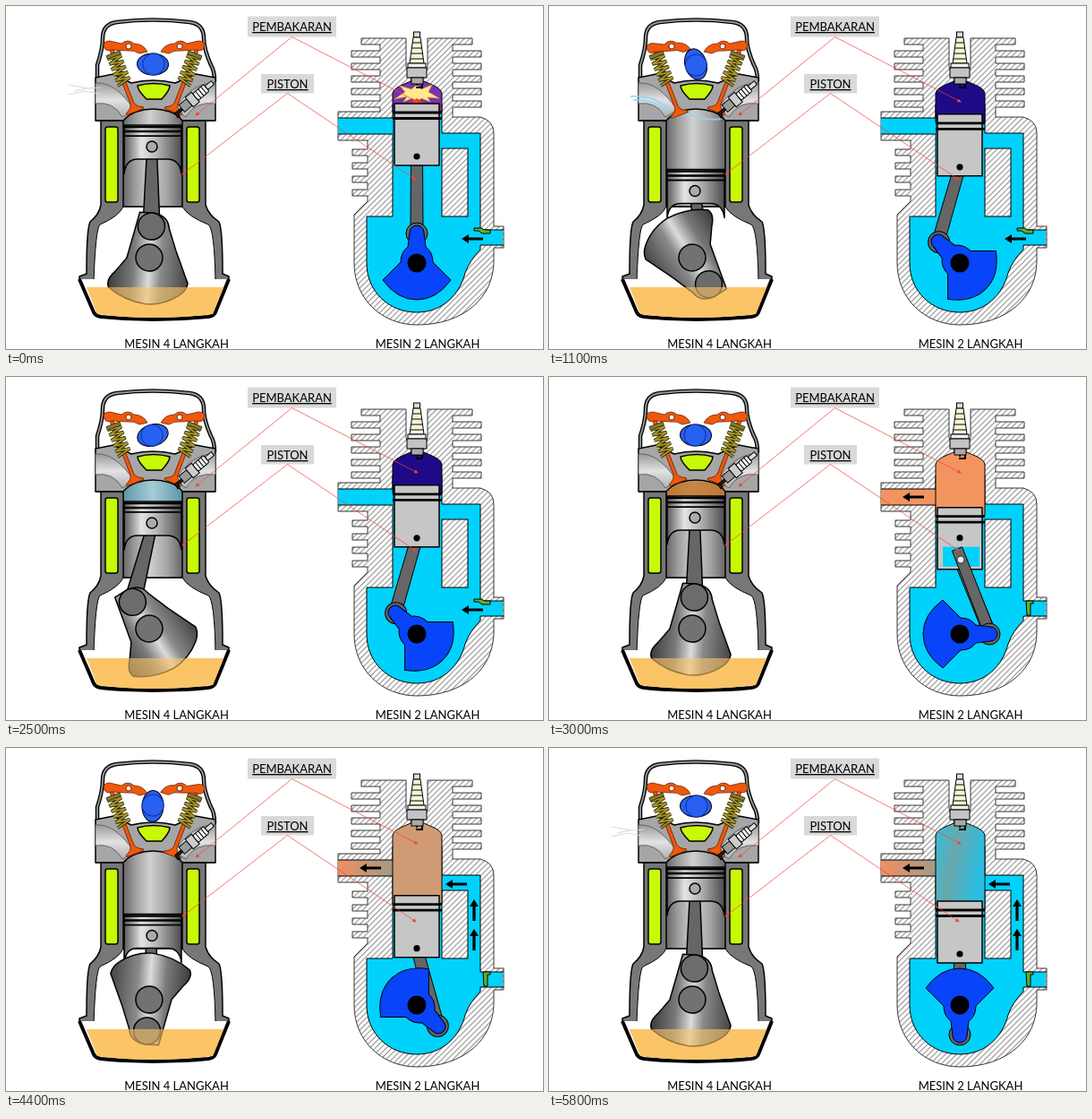
An HTML page that plays this animation: 600 by 383 pixels, repeating every 5900 ms.

```html
<!DOCTYPE html>
<html lang="id">
<head>
<meta charset="utf-8">
<title>Mesin 4 langkah dan 2 langkah</title>
<style>
html, body { margin: 0; width: 100%; height: 100%; overflow: hidden; background: #fff; }
svg { display: block; width: 600px; height: 383px; }
text { font: 13px Carlito, Lato, sans-serif; text-anchor: middle; fill: #000; }
.tag text { text-decoration: underline; }
.tag rect { fill: #d9d9d9; }
.ink { stroke: #000; stroke-width: 1.5; stroke-linejoin: round; }
.thin { stroke: #000; stroke-width: 1; }
.line { fill: none; stroke: #000; }
.call { fill: none; stroke: #f0443a; stroke-width: .7; marker-end: url(#tip); }
.orange { fill: #f0580c; stroke: #6a2408; stroke-width: .8; }
.lime { fill: #c8fa08; }
.blue { fill: #00d2fc; }
.oil { fill: #fcc568; }
</style>
</head>
<body>
<svg viewBox="0 0 600 383">
<defs>
  <marker id="tip" viewBox="0 0 6 6" refX="5" refY="3" markerWidth="4.500" markerHeight="4.500" markerUnits="userSpaceOnUse" orient="auto">
    <path d="M0 0L6 3L0 6Z" fill="#f0443a"/>
  </marker>
  <linearGradient id="bore">
    <stop stop-color="#666"/><stop offset=".18" stop-color="#999"/><stop offset=".45" stop-color="#d0d0d0"/>
    <stop offset=".75" stop-color="#a4a4a4"/><stop offset="1" stop-color="#666"/>
  </linearGradient>
  <linearGradient id="steel">
    <stop stop-color="#5a5a5a"/><stop offset=".3" stop-color="#e4e4e4"/><stop offset=".55" stop-color="#bbb"/>
    <stop offset="1" stop-color="#4c4c4c"/>
  </linearGradient>
  <linearGradient id="web">
    <stop stop-color="#3c3c3c"/><stop offset=".3" stop-color="#7a7a7a"/><stop offset=".5" stop-color="#dcdcdc"/>
    <stop offset=".65" stop-color="#8a8a8a"/><stop offset="1" stop-color="#444"/>
  </linearGradient>
  <linearGradient id="port" x2="0" y2="1">
    <stop stop-color="#9a9a9a"/><stop offset=".5" stop-color="#e2e2e2"/><stop offset="1" stop-color="#b0b0b0"/>
  </linearGradient>
  <linearGradient id="charge">
    <stop stop-color="#5d9db4"/><stop offset=".5" stop-color="#a0cbd8"/><stop offset="1" stop-color="#5d9db4"/>
  </linearGradient>
  <linearGradient id="flame">
    <stop stop-color="#b8741c"/><stop offset=".45" stop-color="#f0c850"/><stop offset="1" stop-color="#c07c1c"/>
  </linearGradient>
  <linearGradient id="scavenge" x2="1" y2=".35">
    <stop stop-color="#35c0dc"/><stop offset=".45" stop-color="#68a8ac"/><stop offset="1" stop-color="#28bfe4"/>
  </linearGradient>
  <linearGradient id="spent">
    <stop stop-color="#f09060"/><stop offset="1" stop-color="#a49a88"/>
  </linearGradient>
  <pattern id="hatch" width="4.400" height="4.400" patternUnits="userSpaceOnUse" patternTransform="rotate(45)">
    <rect width="4.400" height="4.400" fill="#fff"/><path d="M.6 0V4.400" stroke="#909090" stroke-width="1.100"/>
  </pattern>
  <clipPath id="sump"><path d="M90 314H243L231 344Q164 352 102 344Z"/></clipPath>
  <path id="arrow" d="M-12 0L-4 -5V-1.6H12V1.6H-4V5Z"/>
  <path id="valve" class="orange" d="M-2 -2H2V64Q3 69 10 72V74H-10V72Q-3 69 -2 64Z"/>
  <path id="rocker" class="orange" d="M110 47Q107 39 116 39L129 42Q136 36 143 42Q153 42 158 51L149 53Q143 49 136 50L118 49Q112 51 110 47Z"/>
  <path id="cover" d="M102 84V66Q108 48 108 36Q108 20 124 18Q164 13 205 18Q221 20 221 36Q221 48 229 66Q233 72 233 84"/>
</defs>

<!-- four-stroke engine -->
<g id="four">
  <use href="#cover" fill="#fff" stroke="#000" stroke-width="4.500"/>
  <use href="#cover" fill="none" stroke="#999" stroke-width="1.800"/>
  <path class="ink" fill="#a6a6a6" d="M100 80L120 76L140 86Q164 80 189 86L212 76L234 80V128H100Z"/>
  <g id="ports"></g>
  <path class="ink lime" d="M147 89Q165 84 183 89Q183 94 174 104H157Q147 94 147 89Z"/>
  <path class="ink" fill="#777" d="M106 128H223V222Q226 233 238 241Q242 249 242 299L249 302V307H82V302L90 299Q90 249 94 241Q104 233 106 222Z"/>
  <path class="thin" fill="#fff" d="M131 224Q126 235 105 244Q100 249 98 308H234Q233 249 226 244Q203 235 197 224Z"/>
  <rect class="ink lime" x="111" y="135" width="14" height="84" rx="2.500"/>
  <rect class="ink lime" x="202" y="135" width="14" height="84" rx="2.500"/>
  <path class="ink" fill="url(#bore)" d="M131 224V128Q137 121 146 118Q164 112 183 118Q192 121 197 128V224Z"/>
  <path id="gas" opacity=".88"/>
  <path class="line" d="M100 128H131M197 128H234"/>
  <path id="smoke" fill="none" stroke="#d8d8d8" d="M70 88L92 92L106 91M76 95L90 92M70 99L88 95L104 98"/>
  <path id="inflow" fill="none" stroke="#8fd6f0" stroke-width="2" opacity=".8"
    d="M91 101Q118 99 136 117M94 105Q118 104 130 117M136 126Q150 118 164 123T192 126"/>
  <g id="gear"></g>
  <g transform="translate(164 65)"><g id="cam" class="thin" fill="#2860f0">
    <ellipse rx="17.500" ry="12"/><circle cx="1" r="12" stroke="#1030a0"/>
  </g></g>
  <g transform="translate(191 119) rotate(-40)" class="thin">
    <path d="M-2 -1H8V2H0V5H-3Z" fill="#222"/>
    <rect x="7" y="-5" width="11" height="10" fill="#999"/>
    <rect x="18" y="-7" width="9" height="14" fill="#ccc"/>
    <rect x="27" y="-5" width="16" height="10" rx="2" fill="#f4f4f4"/>
    <path d="M31 -5V5M35 -5V5M39 -5V5"/>
    <rect x="43" y="-2.500" width="9" height="5" fill="#ddd"/>
  </g>
  <path d="M82 305L98 342Q100 346 106 347Q164 353 226 347Q232 346 234 342L249 305" fill="#fff" stroke="#000" stroke-width="4"/>
  <path class="oil" d="M90 314H243L231 344Q164 352 102 344Z"/>
  <path id="rod4" class="ink" fill="#666"/>
  <g id="piston4">
    <path class="ink" fill="url(#steel)" d="M132 -24H196V30Q194 14 180 14H147Q134 14 132 30Z"/>
    <path class="line" stroke-width="2.400" d="M132 -22H196M132 -17H196"/>
    <path class="line" stroke-width="1.800" d="M132 -12H196"/>
    <circle class="ink" cx="163" r="6" fill="#aaa"/>
  </g>
  <g transform="translate(160 281)"><g id="crank4">
    <path class="ink" fill="url(#web)" d="M-14 -50H2Q18 -48 20 -34L30 -8L45 26Q44 34 36 40Q20 52 0 52Q-25 50 -43 36Q-47 28 -37 18L-25 2L-19 -26Z"/>
    <circle class="ink" cy="-35" r="15" fill="#6c6c6c"/>
    <circle class="ink" r="15" fill="#727272"/>
  </g></g>
  <rect class="oil" x="80" y="314" width="174" height="36" opacity=".6" clip-path="url(#sump)"/>
</g>

<!-- two-stroke engine -->
<g id="two">
  <path id="housing" fill="url(#hatch)" stroke="#222" stroke-width=".9"/>
  <path class="thin blue" d="M432 110V235H403V287C403 319 428 342 459 342C488 342 507 322 513 298Q518 284 530 272V142H487V110Z"/>
  <rect class="thin" x="487" y="159" width="29" height="76" fill="url(#hatch)"/>
  <rect id="exhaust" x="371" y="125" width="61" height="18"/>
  <rect class="blue" x="529" y="250" width="26" height="17"/>
  <path class="line" d="M371 125H432M371 143H432M530 250H556M530 267H556"/>
  <path id="chamber" class="thin"/>
  <g id="burst">
    <path fill="#ffe98c" stroke="#d8a020" stroke-width=".6" d="M459 88L464 93L476 88L472 96L484 103L471 102L474 107L464 103L459 108L454 103L444 107L448 101L434 104L446 96L440 89L453 93Z"/>
    <path fill="#e83820" d="M451 108L459 103L467 108Z"/>
  </g>
  <path id="rod2" class="thin" fill="#666"/>
  <g id="piston2">
    <rect class="ink" x="434" y="0" width="50" height="69" fill="#c6c6c6"/>
    <path class="line" stroke-width="2.800" d="M432 10H487M432 16.500H487"/>
    <circle id="wrist" cx="459" cy="59" r="3.600"/>
    <rect id="window" class="blue" x="440" y="44" width="41" height="22"/>
  </g>
  <path id="rodWindow" class="thin" fill="#666"/>
  <circle id="joint" cx="460" cy="204" r="4" fill="#e8f6fa" stroke="#333"/>
  <g transform="translate(459 287)"><g id="crank2">
    <circle class="thin" cy="-33" r="12" fill="#666"/>
    <path class="thin" fill="#0844fa" d="M-8 -34A8 8 0 0 1 8 -34L10 -18Q18 -12 18 -1L38 19Q22 41 0 41Q-22 41 -38 19L-18 -1Q-18 -12 -10 -18Z"/>
    <circle r="10.500"/>
  </g></g>
  <path id="reedOpen" class="thin" fill="#5fb030" d="M523 248H531L535 250H541V254H532L528 251H523Z"/>
  <path id="reedShut" class="thin" fill="#5fb030" d="M533 250H541V253H538V266H534Z"/>
  <use id="suck" href="#arrow" x="521" y="260"/>
  <use id="blow" href="#arrow" x="407" y="134"/>
  <g id="transfer">
    <use href="#arrow" x="503" y="152"/>
    <use href="#arrow" transform="translate(523 181) rotate(90)"/>
    <use href="#arrow" transform="translate(523 214) rotate(90)"/>
  </g>
  <g class="thin">
    <rect x="455.500" y="29" width="7" height="6" fill="#ddd"/>
    <path fill="#f8f4d8" d="M455 35H463L467 64H451Z"/>
    <path class="line" stroke="#8a7a30" d="M454 41H464M453 47H465M453 53H466M452 59H466"/>
    <rect x="449" y="64" width="20" height="5" fill="#eee"/>
    <rect x="448" y="69" width="22" height="11" fill="#c4c4c4"/>
    <rect x="453" y="80" width="13" height="7" fill="#aaa"/>
    <path class="line" stroke-width="2" d="M459 87V89M465 87V91H458"/>
  </g>
</g>

<g class="tag">
  <rect x="270" y="11.500" width="99" height="23"/><text x="319.500" y="28">PEMBAKARAN</text>
  <rect x="285" y="76" width="59" height="21.500"/><text x="314.500" y="92">PISTON</text>
</g>
<path class="call" d="M319.500 34.500L212 122"/>
<path class="call" d="M319.500 34.500L460 107"/>
<path class="call" d="M314.500 97.500L197 188"/>
<path class="call" d="M314.500 97.500L458 194"/>
<text x="190.500" y="381.500">MESIN 4 LANGKAH</text>
<text x="471" y="381.500">MESIN 2 LANGKAH</text>
</svg>

<script>
const LOOP = 5900, TICK = 100;
const $ = id => document.getElementById(id);
const set = (id, name, value) => $(id).setAttribute(name, value);
const show = (id, on) => set(id, 'visibility', on ? 'visible' : 'hidden');
const rad = deg => deg * Math.PI / 180;

// Valve gear: one half, mirrored for the other side.
function gear(side) {
  let coil = 'M-8 8';
  for (let k = 0; k < 5; k++) coil += `L8 ${10 + k * 6.5}L-8 ${14 + k * 6.5}`;
  return `<g transform="translate(118 49) rotate(-21)">
      <g id="valve${side}"><use href="#valve"/></g>
      <path d="${coil}" fill="none" stroke="#2c2806" stroke-width="3.6"/>
      <path d="${coil}" fill="none" stroke="#a89828" stroke-width="1.8"/>
      <rect x="-8" y="4" width="16" height="4" fill="#8a7a20" stroke="#222" stroke-width=".7"/>
    </g>
    <g id="rocker${side}"><use href="#rocker"/><circle cx="137" cy="45" r="3" fill="#fff" stroke="#7a2a08"/></g>`;
}
const port = '<path fill="url(#port)" stroke="#555" stroke-width=".8" d="M100 86Q122 84 143 116L130 124Q120 106 100 109Z"/>';
const mirror = (a, b) => a + `<g transform="translate(331 0) scale(-1 1)">${b}</g>`;
$('ports').innerHTML = mirror(port, port.replace('M100', 'M97').replace('100 109', '97 109'));
$('gear').innerHTML = mirror(gear('In'), gear('Out'));

// Finned housing outline.
function housing() {
  let d = 'M447 36';
  for (let k = 0; k < 6; k++) d += `V${36 + 14 * k}H${k ? 386 : 397}V${43 + 14 * k}H418`;
  d += 'V118H371V150H404';
  for (let k = 0; k < 4; k++) d += `V${160 + 15 * k}H387V${167 + 15 * k}H404`;
  d += 'V218L389 233V287C389 327 420 356 459 356C512 356 545 325 545 285V270H556V246H545V142Q545 128 530 124H499';
  for (let k = 5; k >= 0; k--) d += `V${43 + 14 * k}H${k ? 531 : 521}V${36 + 14 * k}H499`;
  return d + 'H471V68L465 84H453L447 68Z';
}
set('housing', 'd', housing());

// Tapered bar between two points.
function bar(x1, y1, x2, y2, w1, w2) {
  const len = Math.hypot(x2 - x1, y2 - y1);
  const nx = (y1 - y2) / len / 2, ny = (x2 - x1) / len / 2;
  return `M${x1 + nx * w1} ${y1 + ny * w1}L${x2 + nx * w2} ${y2 + ny * w2}` +
    `L${x2 - nx * w2} ${y2 - ny * w2}L${x1 - nx * w1} ${y1 - ny * w1}Z`;
}

// Twenty poses make two crank turns: five poses for each stroke.
function drawFour(pose) {
  const deg = pose * 36 + 4, a = rad(deg);
  const px = 160 + 35 * Math.sin(a), py = 281 - 35 * Math.cos(a);
  const free = py - Math.sqrt(91 * 91 - (px - 163) ** 2);
  const y = 157 + 0.75 * (free - 155);
  set('piston4', 'transform', `translate(0 ${y})`);
  set('crank4', 'transform', `rotate(${deg})`);
  set('cam', 'transform', `rotate(${deg / 2})`);
  set('rod4', 'd', bar(163, y + 4, px, py, 11, 19));

  const stroke = Math.floor(pose / 5);
  set('gas', 'd', `M132 ${y - 24}V128Q137 122 146 119Q164 113 183 119Q192 122 196 128V${y - 24}Z`);
  set('gas', 'fill', pose === 10 ? '#c67a30' : ['none', 'url(#charge)', 'url(#flame)', 'none'][stroke]);
  show('smoke', pose === 0);
  show('inflow', stroke === 0 && pose > 0);

  const lift = (from, to) => pose > from && pose < to ? 5 * Math.sin(Math.PI * (pose - from) / (to - from)) : 0;
  for (const [side, h] of [['In', lift(0, 6)], ['Out', lift(14, 20)]]) {
    set('valve' + side, 'transform', `translate(0 ${h})`);
    set('rocker' + side, 'transform', `rotate(${-h * 1.6} 137 45)`);
  }
}

const chamberFill = ['#7a32b0', '#f08a50', '#f29460', '#d09a74', 'url(#scavenge)', 'url(#scavenge)', '#2468c0', '#1e0a86'];

// Eight poses make one crank turn.
function drawTwo(pose) {
  const deg = pose * 45, a = rad(deg), s = Math.sin(a), c = Math.cos(a);
  const y = 287 - 31 * c - Math.sqrt(88 * 88 - (31 * s) ** 2);
  const top = y - 59, px = 459 + 34 * s, py = 287 - 34 * c;
  set('piston2', 'transform', `translate(0 ${top})`);
  set('crank2', 'transform', `rotate(${deg})`);
  set('rod2', 'd', bar(459, y, px, py, 13, 14));
  set('chamber', 'd', `M432 ${top + 9}V98C432 91 446 87 452 84H467C473 87 487 91 487 98V${top + 9}Z`);
  set('chamber', 'fill', chamberFill[pose]);

  const cut = pose === 2, open = pose > 1 && pose < 6, mixing = pose > 2 && pose < 6, intake = pose > 5 || pose === 0;
  set('wrist', 'cy', cut ? 34 : 59);
  set('rodWindow', 'd', cut ? bar(456, 192, px, py, 12, 13) : '');
  show('window', cut);
  show('joint', cut);
  show('burst', pose === 0);
  set('exhaust', 'fill', mixing ? 'url(#spent)' : open ? '#f29460' : '#00d2fc');
  show('blow', open);
  show('transfer', mixing);
  show('suck', intake);
  show('reedOpen', intake);
  show('reedShut', !intake);
}

const start = performance.now();
let last = -1;
function frame(now) {
  const tick = Math.floor((Math.max(0, now - start) % LOOP) / TICK);
  if (tick !== last) {
    drawFour(Math.floor((tick + 2) / 3) % 20);
    drawTwo(Math.floor(tick * 8 / 13 + 0.4) % 8);
    last = tick;
  }
  requestAnimationFrame(frame);
}
frame(start);
</script>
</body>
</html>
```
